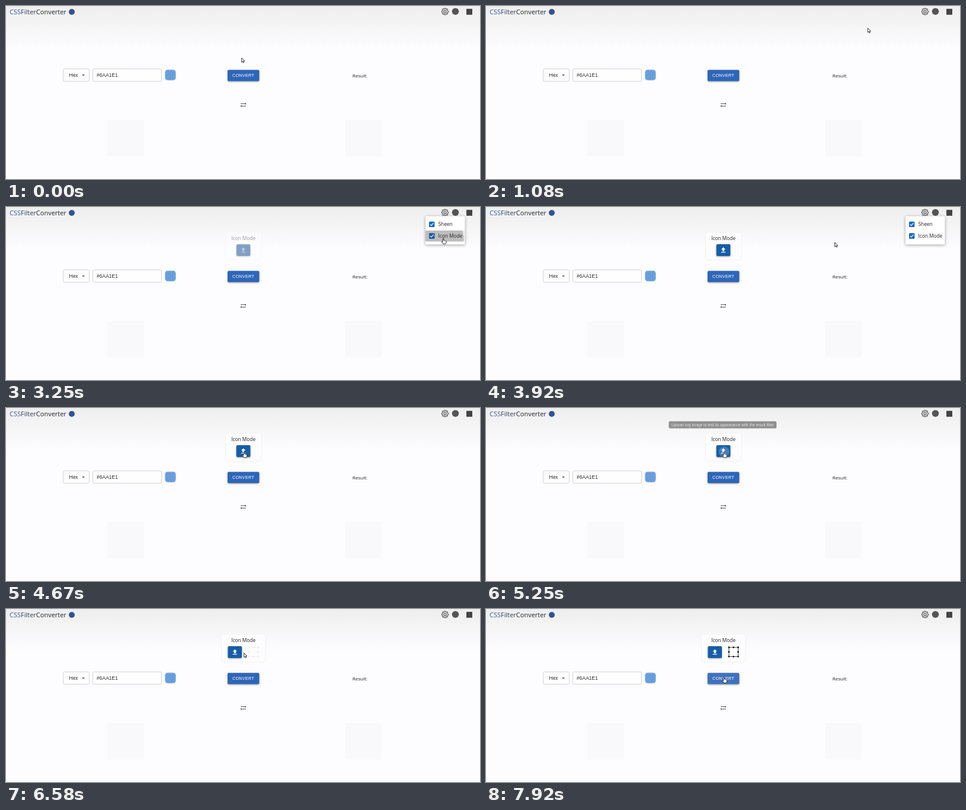
An HTML page with a canvas that plays this animation: 800 px wide and 293 px high, repeating every 8000 ms.

```html
<!DOCTYPE html>
<html lang="en">
<head>
<meta charset="utf-8">
<title>CSSFilterConverter</title>
<style>
html, body { margin: 0; width: 100%; height: 100%; overflow: hidden; background: #fdfcfe; }
canvas { display: block; width: 800px; height: 293px; }
</style>
</head>
<body>
<canvas id="stage"></canvas>
<script>
const W = 800, H = 293, LOOP = 8000;
const SANS = '"Open Sans", sans-serif';
const ARIAL = '"Liberation Sans", Arial, sans-serif';
const canvas = document.getElementById('stage');
const ctx = canvas.getContext('2d');
const dpr = window.devicePixelRatio || 1;
canvas.width = W * dpr;
canvas.height = H * dpr;

const SWAP = new Path2D('M22 8l-4-4v3H3v2h15v3l4-4zM2 16l4 4v-3h15v-2H6v-3l-4 4z');
const UPLOAD = new Path2D('M5 20h14v-2H5v2zm0-10h4v6h6v-6h4l-7-7-7 7z');
const ARROW = new Path2D('M0 0V7.2L1.7 5.7L2.8 8.2L4 7.7L2.9 5.3H5.1Z');
const HAND = new Path2D('M-.8 .3Q0 -.6 .8 .3V3.4Q2 3 2.4 3.9Q3.5 3.6 3.9 4.5Q4.9 4.4 4.9 5.4V7.2Q4.7 8.6 3.9 9.6H-.2L-2.7 6.1Q-2.9 4.9 -1.6 5.3L-.8 6Z');

// Pointer moves: start, end, x, y
const MOVES = [
  [500, 1250, 681, 30],
  [1300, 1750, 742, 10],
  [2170, 2750, 738, 53],
  [3330, 3830, 588.7, 60],
  [4120, 4670, 401.7, 74.5],
  [6620, 7200, 401.7, 115.5]
];

const clamp = v => Math.min(1, Math.max(0, v));
const ramp = (t, from, to) => clamp((t - from) / (to - from));
const smooth = v => v * v * (3 - 2 * v);
const easeOut = v => 1 - (1 - v) ** 2;
const inside = (p, x, y, w, h) => p.x >= x && p.x <= x + w && p.y >= y && p.y <= y + h;

function pointerAt(t) {
  let x = 397.7, y = 88;
  for (const [from, to, nx, ny] of MOVES) {
    const k = smooth(ramp(t, from, to));
    x += (nx - x) * k;
    y += (ny - y) * k;
  }
  return { x, y };
}

function text(str, x, y, font, color, spacing = 0) {
  ctx.font = font;
  ctx.letterSpacing = spacing + 'px';
  ctx.fillStyle = color;
  ctx.fillText(str, x, y);
  return ctx.measureText(str).width;
}

function box(x, y, w, h, r, fill, stroke) {
  ctx.beginPath();
  ctx.roundRect(x, y, w, h, r);
  if (fill) { ctx.fillStyle = fill; ctx.fill(); }
  if (stroke) { ctx.strokeStyle = stroke; ctx.lineWidth = 1; ctx.stroke(); }
}

function disc(x, y, r, fill) {
  ctx.beginPath();
  ctx.arc(x, y, r, 0, 2 * Math.PI);
  ctx.fillStyle = fill;
  ctx.fill();
}

function raised(x, y, w, h, r, fill, blur = 3) {
  ctx.save();
  ctx.shadowColor = 'rgba(0,0,0,.38)';
  ctx.shadowBlur = blur * dpr;
  ctx.shadowOffsetY = dpr;
  box(x, y, w, h, r, fill);
  ctx.restore();
}

function glyph(path, cx, cy, size, color) {
  ctx.save();
  ctx.translate(cx - size / 2, cy - size / 2);
  ctx.scale(size / 24, size / 24);
  ctx.fillStyle = color;
  ctx.fill(path);
  ctx.restore();
}

function ripple(x, y, w, h, cx, cy, r, color) {
  ctx.save();
  ctx.beginPath();
  ctx.roundRect(x, y, w, h, 2);
  ctx.clip();
  disc(cx, cy, r, color);
  ctx.restore();
}

function gear(cx, cy, color) {
  const teeth = 8, step = 2 * Math.PI / teeth;
  ctx.beginPath();
  for (let i = 0; i < teeth; i++) {
    for (const [off, r] of [[-.34, 4.4], [-.2, 5.7], [.2, 5.7], [.34, 4.4]]) {
      const a = (i + off) * step;
      ctx.lineTo(cx + r * Math.cos(a), cy + r * Math.sin(a));
    }
  }
  ctx.closePath();
  ctx.strokeStyle = color;
  ctx.lineWidth = 1.1;
  ctx.stroke();
  ctx.beginPath();
  ctx.arc(cx, cy, 2, 0, 2 * Math.PI);
  ctx.stroke();
}

function background() {
  const g = ctx.createLinearGradient(0, 0, 0, 72);
  g.addColorStop(0, '#eeeeef');
  g.addColorStop(.45, '#f5f5f6');
  g.addColorStop(1, '#fdfcfe');
  ctx.fillStyle = g;
  ctx.fillRect(0, 0, W, H);
  for (const cx of [202, 603]) box(cx - 31, 193, 62, 62, 0, '#f9f8fb');
}

function header(hot) {
  const w = text('CSS', 6, 14.2, '11px ' + SANS, '#3c5a96');
  const v = text('Filter', 6 + w, 14.2, '11px ' + SANS, '#30405f');
  text('Converter', 6 + w + v, 14.2, '11px ' + SANS, '#24262e');
  disc(111, 10, 5, '#2f5591');
  gear(741, 9.4, hot ? '#111' : '#555');
  disc(758.5, 9.2, 5.8, '#555');
  box(777, 4.8, 10, 10, 0, '#444');
}

function form(t) {
  box(96.5, 106.5, 44, 21, 2, '#fefefe', '#d2d1d5');
  text('Hex', 106.5, 119.9, '8.4px ' + ARIAL, '#2a2a2a', .08);
  ctx.beginPath();
  ctx.moveTo(128, 116);
  ctx.lineTo(133.2, 116);
  ctx.lineTo(130.6, 118.7);
  ctx.fillStyle = '#6c6c6c';
  ctx.fill();
  box(146.5, 106.5, 116, 21, 2, '#fefefe', '#d2d1d5');
  text('#6AA1E1', 153, 119.9, '8.4px ' + ARIAL, '#2a2a2a', .08);
  box(268.8, 108.2, 17.4, 17.2, 4, '#669edd', '#8db3de');

  raised(374, 108.3, 53.4, 18.9, 2, '#2e66b8');
  const k = ramp(t, 7670, 8000);
  if (k > 0) ripple(374, 108.3, 53.4, 18.9, 402, 116, 6 + 28 * easeOut(k), 'rgba(255,255,255,.08)');
  text('CONVERT', 382, 120.3, '7.3px ' + ARIAL, '#fff', .21);

  glyph(SWAP, 400.5, 167.6, 12, '#585858');
  text('Result:', 584.8, 121, '8px ' + SANS, '#222');
}

function nodeSquare(alpha) {
  if (alpha <= 0) return;
  ctx.save();
  ctx.globalAlpha *= alpha;
  ctx.strokeStyle = '#333';
  ctx.lineWidth = .9;
  ctx.strokeRect(410, 65, 15.6, 15.6);
  for (let i = 0; i < 9; i++) {
    if (i !== 4) disc(410 + 7.8 * (i % 3), 65 + 7.8 * Math.floor(i / 3), 1.45, '#111');
  }
  ctx.restore();
}

function iconPanel(t, wide) {
  const alpha = ramp(t, 3080, 3470);
  if (!alpha) return;
  const bx = wide ? 374.5 : 388.8;
  ctx.save();
  ctx.globalAlpha = alpha;
  if (wide) box(363.5, 42.5, 74.5, 47.5, 5, '#fdfdfe', '#f1f0f3');
  else box(370.5, 42.5, 60.5, 47.5, 5, '#fdfdfe', '#f1f0f3');
  text('Icon Mode', 380.3, 56, '8.3px ' + SANS, '#222');
  raised(bx, 63, 23.6, 20, 2, '#165da8');
  const k = ramp(t, 5150, 5550);
  const fade = 1 - ramp(t, 6080, 6450);
  if (k > 0 && fade > 0) {
    const pulse = .17 + .05 * Math.sin((t - 5150) / 200);
    ripple(bx, 63, 23.6, 20, 401.7, 74, 4 + 11 * easeOut(k), `rgba(255,255,255,${pulse * fade})`);
  }
  glyph(UPLOAD, bx + 11.8, 73, 12.4, '#fff');
  nodeSquare(smooth(ramp(t, 6500, 7100)));
  ctx.restore();
}

function checkbox(cx, cy, on, color) {
  if (!on) {
    box(cx - 4, cy - 4, 8, 8, 1, null, '#666');
    return;
  }
  box(cx - 4.7, cy - 4.7, 9.4, 9.4, 1.2, color);
  ctx.beginPath();
  ctx.moveTo(cx - 2.9, cy + .1);
  ctx.lineTo(cx - 1, cy + 2);
  ctx.lineTo(cx + 3, cy - 2.2);
  ctx.strokeStyle = '#fff';
  ctx.lineWidth = 1.2;
  ctx.stroke();
}

function menu(t, p) {
  const open = ramp(t, 1920, 2140) * (1 - ramp(t, 3930, 4130));
  if (!open) return;
  const s = .75 + .25 * easeOut(open);
  const rowHot = t < 3930 && inside(p, 708, 39.5, 66.5, 19);
  ctx.save();
  ctx.globalAlpha = open;
  ctx.translate(741, 15.5);
  ctx.scale(s, s * s);
  ctx.translate(-741, -15.5);
  raised(708, 15.5, 66.5, 48, 2, '#fff', 5);
  if (rowHot) {
    ctx.fillStyle = '#ececec';
    ctx.fillRect(708, 39.8, 66.5, 18.6);
  }
  const k = ramp(t, 3080, 3420), out = 1 - ramp(t, 3400, 3700);
  if (k > 0 && out > 0) {
    ripple(708, 39.8, 66.5, 18.6, 738, 53, 46 * easeOut(k), `rgba(0,0,0,${.2 * out})`);
  }
  checkbox(718.7, 29.4, true, '#1769c4');
  checkbox(718.7, 49, t >= 3080, rowHot ? '#155aa6' : '#1769c4');
  text('Sheen', 729.5, 32.4, '8.3px ' + SANS, '#222');
  text('Icon Mode', 729.5, 52, '8.3px ' + SANS, '#222');
  ctx.restore();
}

function tooltip(t) {
  const alpha = ramp(t, 4750, 4950) * (1 - ramp(t, 5180, 5440));
  if (!alpha) return;
  ctx.save();
  ctx.globalAlpha = alpha;
  box(308.5, 22.5, 181.8, 12, 2, 'rgba(97,97,97,.94)');
  text('Upload svg image to test its appearance with the result filter', 313, 30.7, '6.54px ' + ARIAL, '#fff');
  ctx.restore();
}

function pointer(p, hand) {
  ctx.save();
  ctx.translate(p.x, p.y);
  ctx.lineJoin = 'round';
  ctx.lineWidth = .9;
  ctx.strokeStyle = '#222';
  ctx.fillStyle = '#fff';
  const shape = hand ? HAND : ARROW;
  ctx.fill(shape);
  ctx.stroke(shape);
  ctx.restore();
}

function draw(t) {
  const p = pointerAt(t);
  const wide = t >= 6500;
  const onGear = inside(p, 734, 3, 14, 14);
  const onMenu = t > 1920 && t < 3930 && inside(p, 708, 15.5, 66.5, 48);
  const onUpload = t > 3470 && inside(p, wide ? 374.5 : 388.8, 63, 23.6, 20);
  const onConvert = inside(p, 374, 108, 53.4, 19);

  ctx.setTransform(dpr, 0, 0, dpr, 0, 0);
  background();
  header(onGear);
  form(t);
  iconPanel(t, wide);
  tooltip(t);
  menu(t, p);
  pointer(p, onGear || onMenu || onUpload || onConvert);
}

function tick() {
  draw(performance.now() % LOOP);
  requestAnimationFrame(tick);
}
tick();
</script>
</body>
</html>
```
